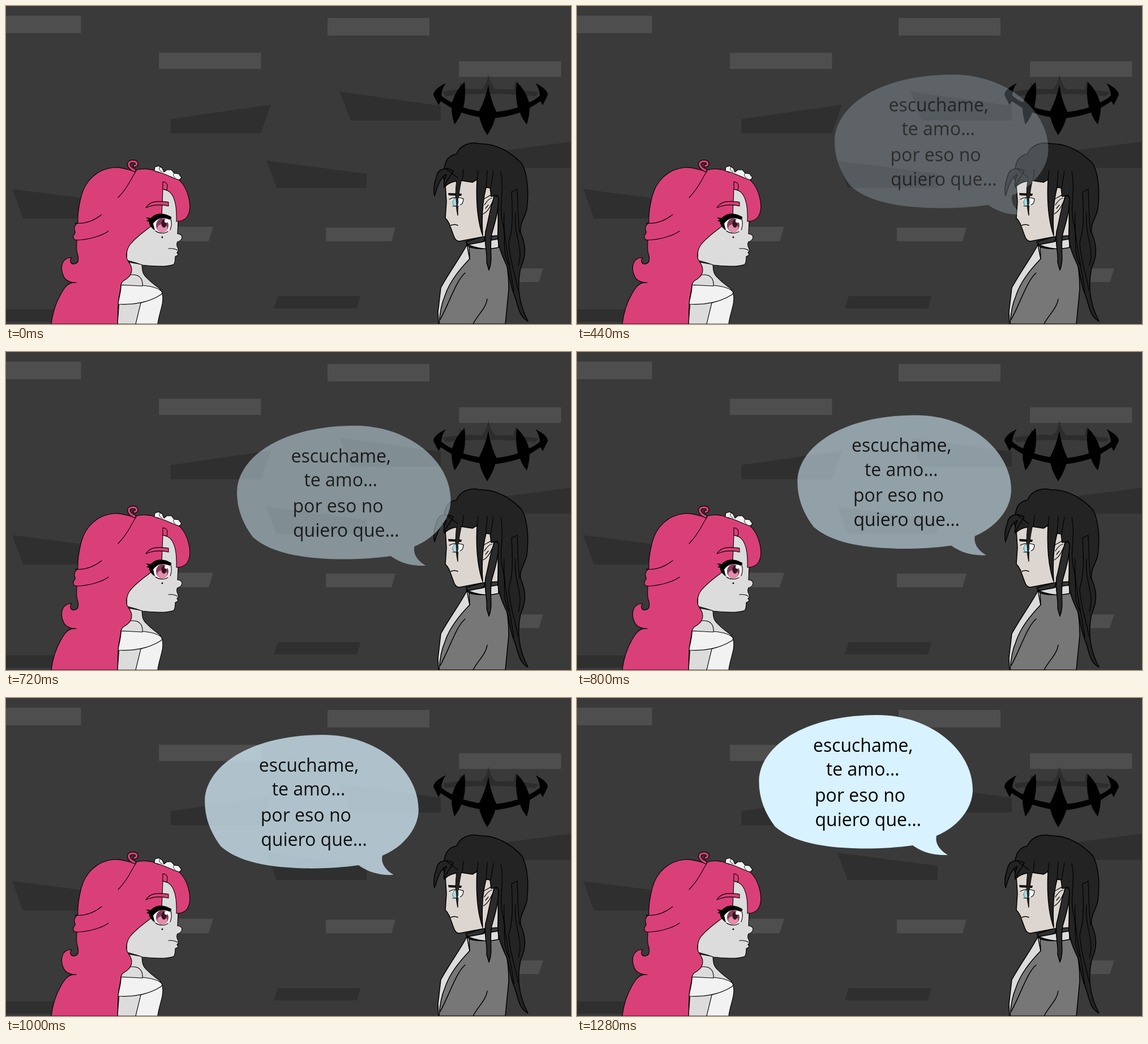
An HTML page for the animation above (3.76 s loop, 998x561 px).

```html
<!DOCTYPE html>
<html lang="es">
<head>
<meta charset="utf-8">
<title>Escuchame</title>
<style>
  html, body { margin: 0; width: 100%; height: 100%; overflow: hidden; background: #3a3a3a; }
  svg { display: block; width: 100%; height: 100%; }
  .line { fill: none; }
  .ink { stroke: #000; stroke-width: 1.1; stroke-linejoin: round; stroke-linecap: round; }
  .bold { stroke-width: 1.5; }
  text { font: 32px "Open Sans", "Noto Sans", sans-serif; }
</style>
</head>
<body>
<svg viewBox="0 0 998 561">
  <rect width="998" height="561" fill="#3a3a3a"/>

  <!-- wall -->
  <path fill="#4e4e4e" d="M0 17H132.500V48H0Z M270 82.500H450.500V111H270Z M568 21H748V52H568Z M800 97.500H980.500V125H800Z
    M280 389.500H366L358 415H280Z M565 391H688L681 415H565Z M890 463H949L941 487H890Z"/>
  <path fill="#2f2f2f" d="M290.500 199.500L468 174L450 224.500H290.500Z M589 151L768 176V202H609Z M460 273L637 296V321H478Z
    M11 323L190 346V375H30Z M870 256L998 239.500V285.500H870Z M480 512H626L620 533.500H473Z M0 535H110V557H0Z"/>

  <!-- woman -->
  <g class="ink">
    <path fill="#dcdcdc" d="M205 450L240 456C241 465 240 471 247 478C255 487 264 493 273 500L250 525L229 561H197L203 480Z"/>
    <path fill="#f2f2f2" d="M276 507C280 525 270 541 268 561H229L238 524Z"/>
    <path fill="#f2f2f2" d="M203 492C225 493 254 490 272 501Q278 505 274 509C254 522 226 528 198 526C199 515 204 503 203 492Z"/>
    <path fill="#dcdcdc" d="M203 492C205 480 213 474 224 474C238 474 242 484 241 494Q222 493 203 492Z"/>
    <path fill="#dcdcdc" d="M277 318L304 325V380L303 402Q310 402 311 408Q310 414 303 416Q300 421 304 428L305 432L302 435Q306 439 301 441L299 442Q299 453 296 456C283 461 258 459 241 457C230 453 222 450 213 449L214 420L262 375Z"/>
    <path fill="#da4078" d="M80 561C83 536 91 515 104 497Q111 487 124 488C113 488 104 484 101 475C95 461 99 443 116 444C111 450 115 456 121 455C129 453 128 447 127 440C123 430 125 421 125 413Q118 413 119 405Q123 401 122 398Q119 392 123 386L127 382C126 365 130 347 133 335C140 309 160 288 190 285C204 284 215 288 224 291C237 286 255 286 268 293C286 295 300 301 308 309C321 323 327 347 324 362C321 376 312 380 301 380C302 353 298 327 280 324L277 323L275 373C257 390 233 403 219 421C212 431 212 442 214 447C217 453 222 457 222 465C222 474 217 478 212 482Q204 486 203 492C202 506 198 515 198 527L197 561Z"/>
    <path fill="#da4078" d="M277 310Q286 311 285 319L284 325L277 323Z"/>
    <path class="line" stroke-width="6" d="M227 290C214 284 214 274 224 274C232 274 233 281 227 282"/>
    <path class="line" style="stroke:#da4078" stroke-width="3.600" d="M227 290C214 284 214 274 224 274C232 274 233 281 227 282"/>
    <path class="line" d="M230 291C222 301 218 318 198 338 M122 383C138 385 155 379 169 368 M125 413C146 412 169 406 181 397"/>
    <path fill="#f2f2f2" d="M262 291L263 284L270 282L276 286L279 293L284 289L292 289L297 295L305 296L310 303L306 307C293 303 278 294 262 291Z"/>
    <path class="line" stroke-width=".8" d="M272 283Q268 290 276 293 M297 295Q293 299 299 303"/>
    <path fill="#da4078" d="M247 356C255 343 268 344 287 346V353C271 349 258 351 247 356Z"/>
    <path class="line" d="M287 428Q296 427 303 431"/>
  </g>
  <path fill="#fff" d="M256 380C264 369 284 370 290 378Q293 394 282 400Q265 404 256 380Z"/>
  <ellipse cx="276" cy="387" rx="11" ry="12.500" fill="#8a3b5a"/>
  <ellipse cx="276" cy="392" rx="9" ry="7" fill="#e58bab"/>
  <ellipse cx="279" cy="384" rx="4.500" ry="7" fill="#351522"/>
  <circle cx="283" cy="379.500" r="3" fill="#fff"/>
  <path d="M247 373L256 374C265 363 281 365 292 372Q293 375 289 377C277 372 267 374 260 384L263 396C256 391 252 385 253 381L248 379L252 377Z"/>
  <path class="ink line" d="M264 397Q275 404 286 398 M291 375Q294 386 290 395"/>
  <circle cx="276" cy="408" r="1.400"/>

  <!-- man -->
  <g class="ink bold">
    <path fill="#dcdcdc" d="M814 421C805 440 784 468 768 497L763 540L764 561H810L832 440Z"/>
    <path fill="#777" d="M818 425C838 431 856 427 872 425C884 440 888 470 888 500L882 561H765C766 545 768 528 775 512C783 487 800 466 819 446Z"/>
    <path class="line" d="M814 421L819 446 M811 471C795 484 784 522 767 553 M850 517C848 533 833 545 825 561"/>
    <path fill="#dcdcdc" d="M814 420L870 411V426C852 430 831 429 814 420Z"/>
    <path fill="#303030" d="M812 416L848 405L843 416L816 421Z"/>
    <path fill="#ddd6d0" d="M775 300L778 345L776 374Q780 378 783 384L791 406Q794 415 801 415L843 407L869 405L870 320L840 290Z"/>
    <path fill="#ddd6d0" stroke-width="1.200" d="M840 348C842 337 850 340 859 331Q864 337 858 348Q852 362 843 367"/>
    <path class="line" stroke-width="1.200" d="M845 351Q852 340 858 339 M847 357L852 351"/>
    <path fill="#232323" d="M776 318L772 299C775 285 773 265 796 261C801 246 821 238 837 243C869 242 895 261 911 278C923 299 923 334 920 358C916 376 907 382 909 400C919 423 919 440 909 462C902 494 905 524 922 556C904 547 905 525 896 505C891 492 888 470 885 459C875 438 867 418 869 400C871 377 868 353 868 334L857 336L855 321L848 320C841 347 840 375 842 405C833 379 830 344 832 306L824 311L804 308Q797 340 798 369Q792 340 796 309Q785 310 776 318Z"/>
    <path fill="#232323" d="M790 291C776 283 762 287 760 303C755 315 755 328 757 335C763 315 768 301 778 297Q772 309 774 320C779 304 785 302 790 291Z"/>
    <path fill="#2b2b2b" d="M864 334C855 351 853 377 847 398C844 420 851 437 849 452L853 466C861 446 853 430 858 402C865 378 870 360 870 338Z"/>
    <path class="line" stroke-width="1.200" d="M778 288L798 303 M808 288L806 308 M834 290L832 306 M850 290L848 320 M861 291L856 321 M874 292C881 325 870 350 877 382C885 406 874 430 889 458 M893 328L903 323C904 347 904 370 907 400 M893 328C895 361 896 393 888 417C889 449 900 472 904 501 M880 365C877 408 890 452 897 504 M900 365C896 405 915 425 905 458"/>
    <path class="line" d="M786 387Q792 384 798 387"/>
  </g>
  <path d="M781 330L805 331L804 335L782 334Z"/>
  <path fill="#f5f5f5" d="M786 341Q799 335 807 341Q809 350 802 352Q792 355 786 341Z"/>
  <ellipse cx="794" cy="346" rx="5" ry="7" fill="#a9dce4" stroke="#477" stroke-width="1"/>
  <path class="ink line" d="M783 341Q794 335 808 340Q808 349 802 351 M789 353H799"/>
  <path fill="#232323" d="M796 309H804Q797 340 798 369Q792 340 796 309Z"/>

  <!-- crown -->
  <path fill="#2d2d2d" d="M772 151Q812 144 840 147Q849 139 852 121Q856 139 865 147Q898 146 941 152L935 159Q852 151 776 159Z M802 136Q813 143 808 157L800 155Z M900 131Q907 145 903 157L895 155Z"/>
  <g id="halfCrown">
    <path d="M777 136C765 142 755 149 755 157L764 175L768 168Q777 174 787 180Q787 192 792 209Q801 198 804 188Q828 196 858 199V188Q830 186 808 179Q813 158 810 134Q795 147 788 170Q778 166 769 158Q770 145 777 136Z"/>
  </g>
  <use href="#halfCrown" transform="matrix(-1 0 0 1 1712 0)"/>
  <path d="M852 139Q856 166 866 186Q865 205 850 228Q836 206 835 187Q847 164 852 139Z"/>

  <!-- speech bubble -->
  <g id="bubble">
    <path fill="#d8f2ff" d="M350 227C331 202 321 175 321.500 146C323 86 400 30 530 30C625 30 699 92 699 162C699 195 672 228 635 243C632 256 640 268 655 277C630 278 612 273 593 260C565 264 530 266 500 265.500C430 264 380 253 350 227Z"/>
    <text x="417" y="94.500">escuchame,</text>
    <text x="440" y="137">te amo…</text>
    <text x="420" y="182.500">por eso no</text>
    <text x="420.500" y="225.500">quiero que…</text>
  </g>
</svg>
<script>
  const LOOP = 3760, STEP = 40, START = 200, END = 1280;
  const bubble = document.getElementById("bubble");

  // time in ms, then the offset from the resting place
  const path = [
    [200, 172, 87], [240, 168, 87], [440, 133.5, 91], [560, 125, 109], [640, 109, 112.5],
    [720, 86.5, 100], [880, 51.5, 62.5], [1120, 11.5, 11.5], [1280, 0, 0]
  ];

  function slope(i, axis) {
    if (i === path.length - 1) return 0;
    const a = path[Math.max(i - 1, 0)], b = path[i + 1];
    return (b[axis] - a[axis]) / (b[0] - a[0]);
  }

  function offset(time, axis) {
    const i = path.findIndex((p, n) => n === path.length - 2 || time < path[n + 1][0]);
    const a = path[i], b = path[i + 1], span = b[0] - a[0];
    const u = (time - a[0]) / span, v = 1 - u;
    return v * v * (1 + 2 * u) * a[axis] + u * u * (1 + 2 * v) * b[axis]
      + span * u * v * (v * slope(i, axis) - u * slope(i + 1, axis));
  }

  function draw() {
    const now = Math.floor(performance.now() % LOOP / STEP) * STEP;
    const time = Math.min(Math.max(now, START), END);
    bubble.setAttribute("transform", `translate(${offset(time, 1)} ${offset(time, 2)})`);
    bubble.setAttribute("opacity", (time - START) / (END - START));
    requestAnimationFrame(draw);
  }
  draw();
</script>
</body>
</html>
```
